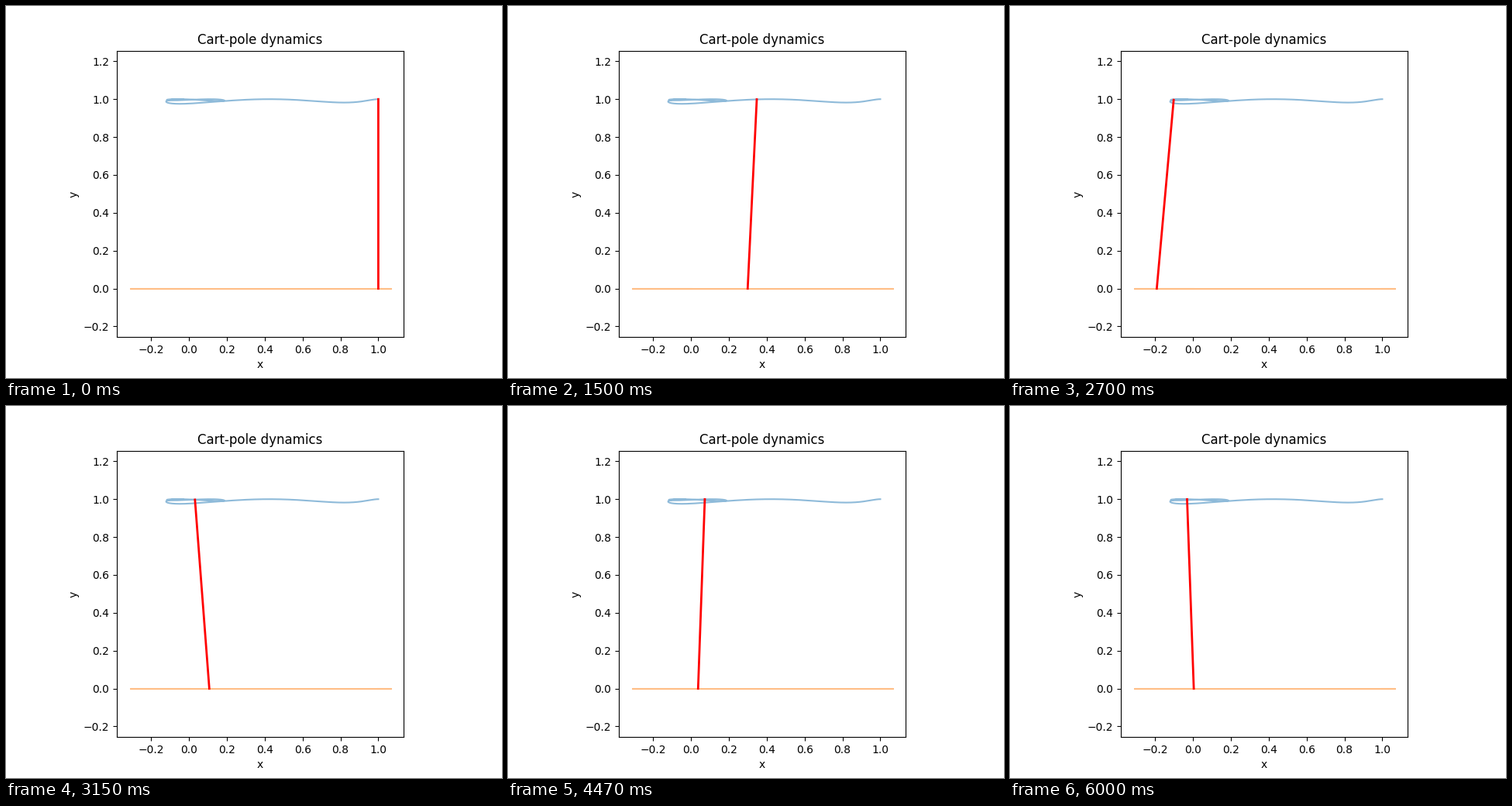
Write a matplotlib script that moves like this. It is 640x480 px and loops after 6.03 s.

```python
import numpy as np
import matplotlib.pyplot as plt
from matplotlib.animation import FuncAnimation

FRAMES = 201
INTERVAL = 30  # ms

# Closed-loop modes per 100 steps: a slow swing, a fast one, two plain decays
SLOW, FAST = -0.63 + 6.41j, -3.2 + 6.41j
POLES = np.array([SLOW, SLOW.conjugate(), FAST, FAST.conjugate(), -3.2, -6.4])

# A few poses: step, cart x, tip x
POSES = np.array([
    (0, 1, 1), (21, 1.051, 0.868), (31, 0.918, 0.744), (42, 0.597, 0.540),
    (63, -0.118, 0.069), (77, -0.311, -0.105), (90, -0.195, -0.108),
    (105, 0.106, 0.029), (120, 0.301, 0.153), (148, 0.043, 0.064),
    (168, -0.200, -0.088), (200, 0.009, -0.024),
])


def modes(step):
    return np.exp(np.outer(step, POLES) / 100)


# Mode amplitudes: start at rest in the first pose, pass by the others
weight = np.where(POSES[:, :1] == 0, 20, 1)
lhs = np.vstack([POLES, weight * modes(POSES[:, 0])])
rhs = np.vstack([[0, 0], weight * POSES[:, 1:]])
amps = np.linalg.lstsq(lhs, rhs.astype(complex), rcond=None)[0]

cart, tip_x = (modes(np.arange(FRAMES)) @ amps).real.T
tip_y = np.sqrt(1 - (tip_x - cart) ** 2)  # pole of length 1

fig, ax = plt.subplots(figsize=(6.4, 4.8), dpi=100)
ax.plot(tip_x, tip_y, color="C0", alpha=0.5)
ax.plot(cart, np.zeros(FRAMES), color="C1", alpha=0.5)
pole, = ax.plot([], [], color="red", lw=2)

ax.set_title("Cart-pole dynamics")
ax.set_xlabel("x")
ax.set_ylabel("y")
ax.set_xlim(-0.3798, 1.1325)
ax.set_ylim(-0.2561, 1.2562)
ax.set_aspect("equal")


def update(i):
    pole.set_data([cart[i], tip_x[i]], [0, tip_y[i]])
    return pole,


anim = FuncAnimation(fig, update, frames=FRAMES, interval=INTERVAL, repeat=True)
plt.show()
```
